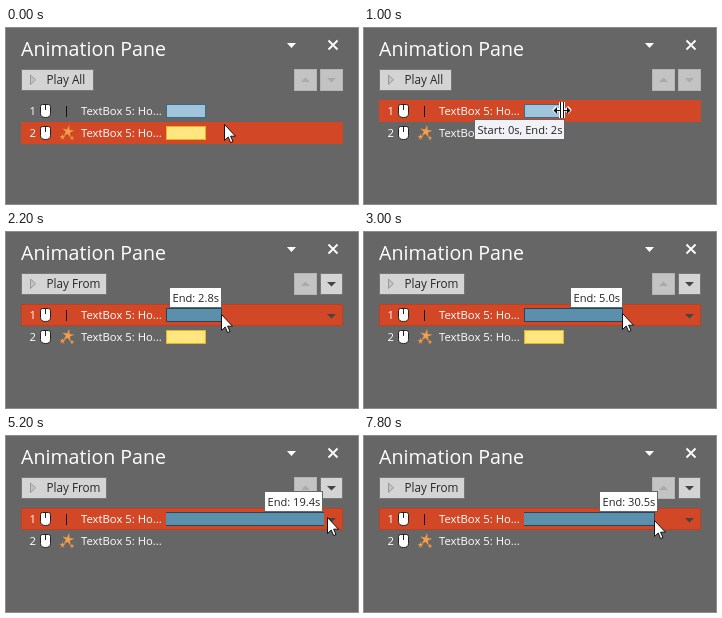
An HTML page for the animation above (8 s loop, 352 by 176 pixels).

```html
<!DOCTYPE html>
<html lang="en">
<head>
<meta charset="utf-8">
<title>Animation Pane</title>
<style>
  html, body { margin: 0; width: 100%; height: 100%; overflow: hidden; background: #666; }
  svg { display: block; }
  text { font: 11.3px "Open Sans", "Noto Sans", sans-serif; fill: #fff; white-space: pre; }
  .title { font-size: 19.6px; }
  .button text { font-size: 11.7px; fill: #262626; }
  .tip text { font-size: 11.1px; fill: #222; }
  rect, .crisp { shape-rendering: crispEdges; }
  .face { fill: #d4d4d4; stroke: #777; }
  .glyph { fill: #444; }
  .off .face { fill: #c3c3c3; stroke: #b4b4b4; }
  .off .glyph { fill: #aaa; }
</style>
</head>
<body>
<svg id="stage" width="352" height="176" viewBox="0 0 352 176">
  <defs>
    <g id="mouse">
      <path d="M34.500 2.500Q34.500.500 36.500.500H42.500Q44.500.500 44.500 2.500V9.500Q44.500 13.500 39.500 13.500T34.500 9.500Z" fill="#fff" stroke="#222"/>
      <path class="crisp" d="M39.500 1v5" stroke="#222"/>
    </g>
    <path id="star" d="M0-7 1.300-2 6.500-2 2.200.8 4 6 0 2.600-4 6-2.200.8-6.500-2-1.300-2Z"/>
  </defs>
  <rect width="352" height="176" fill="#666"/>
  <text class="title" x="15" y="28">Animation Pane</text>
  <path d="M281 15h9l-4.500 5z" fill="#fff"/>
  <path d="M322.500 12.500l9 9m0-9l-9 9" stroke="#fff" stroke-width="1.800"/>

  <g class="button">
    <rect id="playFace" class="face" x="15.500" y="41.500" height="21"/>
    <path d="M24.500 47v9.500l5-4.750z" fill="#c4c4c4" stroke="#999"/>
    <text id="playLabel" x="40.500" y="56"></text>
  </g>
  <g class="off">
    <rect class="face" x="288.500" y="41.500" width="22" height="21"/>
    <path class="glyph" d="M295 54h9l-4.500-4.500z"/>
  </g>
  <g id="down">
    <rect class="face" x="314.500" y="41.500" width="22" height="21"/>
    <path class="glyph" d="M321 50h9l-4.500 4.500z"/>
  </g>

  <rect id="highlight" x="15.500" width="321" height="21" fill="#d24726"/>
  <text x="23.500" y="87">1</text>
  <use href="#mouse" y="76"/>
  <path class="crisp" d="M60.500 78v11" stroke="#111"/>
  <text x="75" y="87">TextBox 5: Ho...</text>
  <text x="23.500" y="109">2</text>
  <use href="#mouse" y="98"/>
  <g fill="#f5a04c" stroke="#d9853c" stroke-width=".3">
    <use href="#star" transform="translate(62 103.500) rotate(10) scale(.9)"/>
    <use href="#star" transform="translate(56.500 109) scale(.45)"/>
    <use href="#star" transform="translate(66 110) scale(.35)"/>
  </g>
  <text x="75" y="109">TextBox 5: Ho...</text>

  <svg x="160" y="70" width="158" height="50" overflow="hidden">
    <rect id="blue" y="6.500" height="13"/>
    <rect id="yellow" y="28.500" width="39" height="13" fill="#ffe680" stroke="#e6b422"/>
  </svg>
  <path id="menu" d="M321 82h9l-4.500 4.500z" fill="#444"/>

  <g id="tip" class="tip">
    <rect id="tipBox" x=".5" y=".5" height="20" stroke="#666"/>
    <text id="tipLabel" x="3.500" y="15"></text>
  </g>
  <path id="arrow" d="M.5.500V16.500L4.200 13 6.600 18.600 9 17.500 6.600 12.200H11.500Z" fill="#fff" stroke="#111"/>
  <g id="resize" stroke-linejoin="round">
    <path d="M-1.500-8v16M1.500-8v16M-2 0h-5M2 0h5M-5-3-8 0-5 3M5-3 8 0 5 3" fill="none" stroke="#fff" stroke-width="3"/>
    <path class="crisp" d="M-1.500-8v16M1.500-8v16M-2 .5h-6M2 .5h6" fill="none" stroke="#111"/>
    <path d="M-5-3-8.500.5-5 4ZM5-3 8.500.5 5 4Z" fill="#111"/>
  </g>
</svg>
<script>
const $ = id => document.getElementById(id);
const set = (id, attrs) => {
  for (const name in attrs) $(id).setAttribute(name, attrs[name]);
};
const show = (id, on) => set(id, { visibility: on ? "visible" : "hidden" });
const move = (id, x, y) => set(id, { transform: `translate(${x} ${y})` });

const STEP = 200, STEPS = 40;
const LEFT = 160, PX_PER_SEC = 20;
const PRESS = 8, SCROLL = 20, RETURN = 34;

// Linear interpolation through [step, value] points.
function along(points, n) {
  if (n <= points[0][0]) return points[0][1];
  for (let i = 1; i < points.length; i++) {
    const [a, from] = points[i - 1], [b, to] = points[i];
    if (n <= b) return from + (to - from) * (n - a) / (b - a);
  }
  return points[points.length - 1][1];
}

const barEnd = [[8, 200], [9, 203], [11, 216], [13, 233], [19, 312], [20, 320],
  [33, 320], [34, 307], [35, 297], [36, 297], [39, 291]];
const scrolledSeconds = [[19, 7.6], [26, 19.4], [33, 30.9]];
const approachX = [[0, 218], [1, 216], [4, 199]];
const approachY = [[0, 96], [1, 95], [2, 90], [4, 82]];

function seconds(n, end) {
  if (n < SCROLL) return (end - LEFT) / PX_PER_SEC;
  if (n < RETURN) return along(scrolledSeconds, n);
  return 30.8 + (end - 297) / PX_PER_SEC;
}

function draw(n) {
  const dragging = n >= PRESS;
  const end = Math.round(along(barEnd, n));
  const sec = seconds(n, end);
  const length = Math.round(sec * PX_PER_SEC);
  const start = end - LEFT - length;

  $("playLabel").textContent = dragging ? "Play From" : "Play All";
  set("playFace", { width: dragging ? 85 : 72 });
  set("down", { class: dragging ? "" : "off" });
  set("highlight", {
    y: n < 2 ? 94.5 : 72.5,
    stroke: dragging ? "#c03f20" : "#d24726"
  });
  set("blue", {
    x: start + .5, width: length - 1,
    fill: dragging ? "#5b8fab" : "#a0c4da",
    stroke: dragging ? "#254657" : "#3a6a85"
  });
  set("yellow", { x: start + .5 });
  show("menu", dragging);

  show("tip", n >= 5);
  if (dragging) {
    const label = `End: ${sec.toFixed(1)}s`;
    const width = sec < 9.95 ? 53 : 59;
    const right = n < RETURN ? Math.min(end, 317) : end + 3;
    $("tipLabel").textContent = label;
    set("tipBox", { width: width - 1, fill: "#fff" });
    move("tip", right - width, 55);
  } else {
    $("tipLabel").textContent = "Start: 0s, End: 2s";
    set("tipBox", { width: 90, fill: "#f1f2f7" });
    move("tip", 110, 91);
  }

  const resizing = n >= 4 && !dragging;
  show("arrow", !resizing);
  show("resize", resizing);
  move("resize", 198, 82);
  if (dragging) {
    const y = n < 14 ? 82 : n < RETURN ? 81 : Math.min(84, 82 + (n - RETURN) * 2);
    move("arrow", end === 320 ? 321 : end - 1, y);
  } else {
    move("arrow", Math.round(along(approachX, n)), Math.round(along(approachY, n)));
  }
}

const began = performance.now();
function tick() {
  draw(Math.floor(Math.max(0, performance.now() - began) / STEP) % STEPS);
  requestAnimationFrame(tick);
}
draw(0);
requestAnimationFrame(tick);
</script>
</body>
</html>
```
